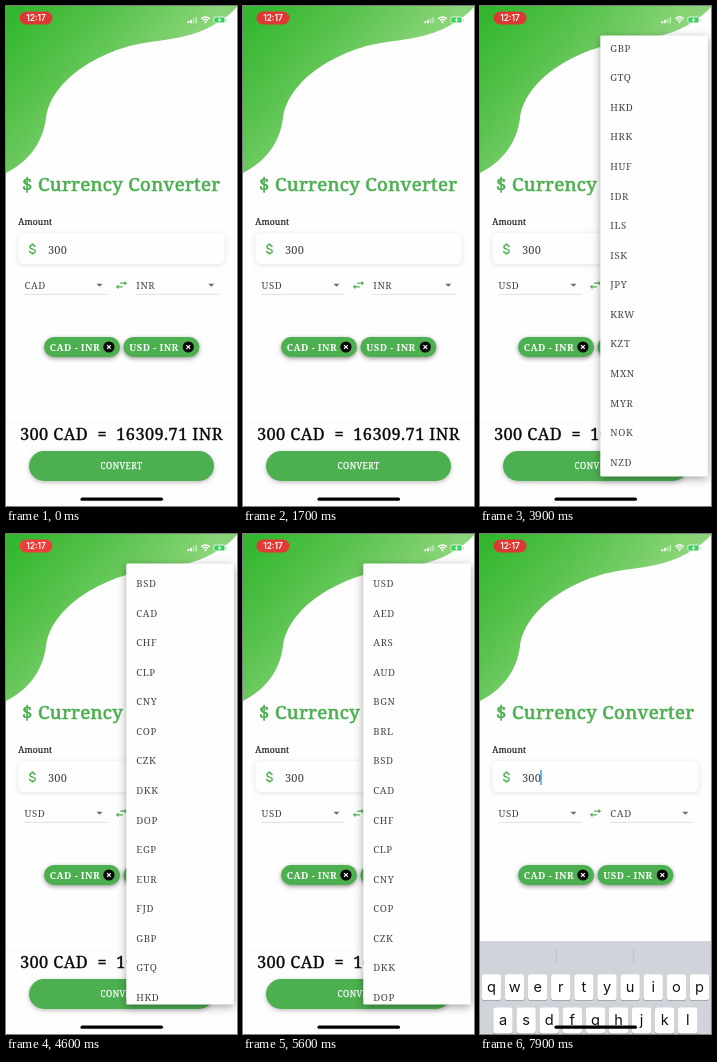
An HTML page with a canvas that plays this animation: 231x500 px, repeating every 8 s.

```html
<!DOCTYPE html>
<html lang="en">
<head>
<meta charset="utf-8">
<title>Currency Converter</title>
<style>
  html, body { margin: 0; width: 100%; height: 100%; overflow: hidden; background: #fefefe; }
  canvas { display: block; width: 231px; height: 500px; }
</style>
</head>
<body>
<canvas id="stage"></canvas>
<script>
const W = 231, H = 500, LOOP = 8000, STEP = 100;
const DP = W / 375;                 // one layout unit in pixels
const GREEN = '#4caf50';
const SERIF = '"Noto Serif", serif', SANS = 'Inter, sans-serif';

const CODES = ('USD AED ARS AUD BGN BRL BSD CAD CHF CLP CNY COP CZK DKK DOP EGP EUR FJD GBP GTQ HKD ' +
  'HRK HUF IDR ILS ISK JPY KRW KZT MXN MYR NOK NZD PAB PEN PHP PKR PLN PYG RON RUB SAR SEK SGD ' +
  'THB TRY TWD UAH UYU ZAR INR').split(' ');
const ITEM = 48 * DP, PAD = 8 * DP;
const MENU_TOP = 48 * DP, MENU_BOTTOM = H - 48 * DP, MENU_H = MENU_BOTTOM - MENU_TOP;
const MAX_SCROLL = CODES.length * ITEM + 2 * PAD - MENU_H;

const LEFT = { x: 8.5, open: 380, close: 1620, from: 'CAD', to: 'USD' };
const RIGHT = { x: 120.3, open: 2280, close: 6320, from: 'INR', to: 'CAD' };
const MENU_W = 107.5;
const CODE_STYLE = { spacing: 0.6 };

// Each fling: start, end, scroll before, scroll after
const FLINGS = [
  [3100, 3800, MAX_SCROLL, 22 * ITEM],
  [3800, 4600, 22 * ITEM, 6 * ITEM],
  [4800, 5500, 6 * ITEM, 0]
];

const canvas = document.getElementById('stage');
const ctx = canvas.getContext('2d');
const ratio = window.devicePixelRatio || 1;
canvas.width = Math.round(W * ratio);
canvas.height = Math.round(H * ratio);

const clamp = v => Math.min(1, Math.max(0, v));
const span = (v, a, b) => clamp((v - a) / (b - a));
const mix = (a, b, k) => a + (b - a) * k;
const easeOut = k => 1 - (1 - k) ** 2;
const ease = k => k * k * (3 - 2 * k);

const swapIcon = new Path2D('M6.99 11L3 15l3.99 4v-3H14v-2H6.99v-3zM21 9l-3.99-4v3H10v2h7.01v3z');
const dropIcon = new Path2D('M7 10l5 5 5-5z');
const boltIcon = new Path2D('M1 -3.4L-2 .5H-.2L-1 3.4L2 -.6H.2z');
const blob = new Path2D('M0 0H231V1C224 9 212 17 200 23C180 33 150 34 128 39C100 45 46 70 40 112C37 137 22 156 0 167z');

function box(x, y, w, h, r, fill, shadow) {
  ctx.save();
  if (shadow) {
    ctx.shadowColor = `rgba(0,0,0,${shadow.a})`;
    ctx.shadowBlur = shadow.blur * ratio;
    ctx.shadowOffsetY = shadow.y * ratio;
  }
  ctx.fillStyle = fill;
  ctx.beginPath();
  ctx.roundRect(x, y, w, h, r);
  ctx.fill();
  ctx.restore();
}

function text(str, x, y, size, color, { weight = 400, family = SERIF, align = 'left', thick = 0, spacing = 0 } = {}) {
  ctx.font = `${weight} ${size}px ${family}`;
  ctx.letterSpacing = `${spacing}px`;
  ctx.textAlign = align;
  ctx.fillStyle = color;
  ctx.fillText(str, x, y);
  if (thick) {
    ctx.strokeStyle = color;
    ctx.lineWidth = thick;
    ctx.lineJoin = 'round';
    ctx.strokeText(str, x, y);
  }
}

function line(x1, y1, x2, y2, color, width) {
  ctx.strokeStyle = color;
  ctx.lineWidth = width;
  ctx.beginPath();
  ctx.moveTo(x1, y1);
  ctx.lineTo(x2, y2);
  ctx.stroke();
}

function icon(path, cx, cy, color) {
  ctx.save();
  ctx.translate(cx, cy);
  ctx.scale(DP, DP);
  ctx.translate(-12, -12);
  ctx.fillStyle = color;
  ctx.fill(path);
  ctx.restore();
}

function header() {
  const g = ctx.createLinearGradient(5, 15, 115, 115);
  g.addColorStop(0, '#34b730');
  g.addColorStop(0.45, '#57c24c');
  g.addColorStop(1, '#89d478');
  ctx.fillStyle = g;
  ctx.fill(blob);
}

function statusBar(t) {
  const glow = ((1 + Math.cos((t - 3000) / 2000 * 2 * Math.PI)) / 2) ** 2;
  box(13.5, 5.5, 33, 13, 6.5, `rgb(${mix(222, 255, glow)},${mix(56, 70, glow)},${mix(52, 66, glow)})`);
  text('12:17', 30, 15, 8.3, '#fff', { weight: 600, family: SANS, align: 'center' });

  for (let i = 0; i < 4; i++) {
    const h = 2.2 + i * 1.3;
    box(181.5 + i * 2.6, 17.2 - h, 1.8, h, 0.5, i < 2 ? '#fff' : 'rgba(255,255,255,.45)');
  }

  ctx.strokeStyle = '#fff';
  ctx.lineWidth = 1.3;
  for (const r of [3.6, 6]) {
    ctx.beginPath();
    ctx.arc(199.5, 17, r, -Math.PI * 0.75, -Math.PI * 0.25);
    ctx.stroke();
  }
  ctx.fillStyle = '#fff';
  ctx.beginPath();
  ctx.moveTo(199.5, 17.4);
  ctx.arc(199.5, 17.2, 2.1, -Math.PI * 0.75, -Math.PI * 0.25);
  ctx.fill();

  box(207.5, 10.5, 12, 7, 2, 'rgba(255,255,255,.75)');
  box(208.4, 11.4, 10.2, 5.2, 1.2, '#35cf5b');
  box(220, 12.8, 0.9, 2.4, 0.4, '#b9dcb9');
  ctx.save();
  ctx.translate(213.5, 14);
  ctx.fillStyle = '#fff';
  ctx.fill(boltIcon);
  ctx.restore();
}

function dollar(cx, cy) {
  ctx.save();
  ctx.translate(cx, cy);
  ctx.strokeStyle = GREEN;
  ctx.lineWidth = 1.4;
  ctx.stroke(new Path2D('M2.6 -1.9C2.4 -5 -2.6 -4.8 -2.6 -2C-2.6 1 2.8 -.6 2.8 2.2C2.8 4.8 -2.7 4.9 -2.9 1.7'));
  line(0, -5.6, 0, -4, GREEN, 1.8);
  line(0, 4, 0, 5.6, GREEN, 1.8);
  ctx.restore();
}

function amountField(focused) {
  text('Amount', 12.2, 218.8, 8.6, '#1c1c1c', { thick: 0.2, spacing: 0.15 });
  box(12.5, 227, 206, 31, 5, '#fefefe', { a: 0.11, blur: 5, y: 1 });
  dollar(26.5, 243);
  text('300', 42, 247.5, 11, '#3c3c3c', { spacing: 0.2 });
  if (focused) box(60.3, 236, 1.3, 15, 0.5, '#2485e8');
}

function picker(x, value) {
  text(value, x, 283.2, 9.6, '#444', CODE_STYLE);
  icon(dropIcon, x + 75, 279, '#6b6b6b');
  line(x - 0.3, 288.4, x + 82.7, 288.4, '#d4d4d4', 0.7);
}

function chip(x, label) {
  box(x, 331, 76, 20, 10, GREEN, { a: 0.4, blur: 4, y: 1.5 });
  text(label, x + 5.8, 344.8, 9.5, '#fff', { weight: 700, spacing: 0.4 });
  const cx = x + 64.9, cy = 341, d = 1.9;
  box(cx - 5.6, cy - 5.6, 11.2, 11.2, 5.6, '#060606');
  line(cx - d, cy - d, cx + d, cy + d, '#fff', 1.2);
  line(cx + d, cy - d, cx - d, cy + d, '#fff', 1.2);
}

function bottomBar() {
  const g = ctx.createLinearGradient(0, 413, 0, 417);
  g.addColorStop(0, 'rgba(0,0,0,0)');
  g.addColorStop(1, 'rgba(0,0,0,.015)');
  ctx.fillStyle = g;
  ctx.fillRect(0, 413, W, 4);
  box(0, 417, W, 83, 0, '#fefefe');
  text('300 CAD\u00a0 =\u00a0 16309.71 INR', 115.4, 434.2, 16.4, '#080808', { align: 'center', thick: 0.35, spacing: 0.4 });
  box(23, 445, 185, 30, 15, GREEN, { a: 0.26, blur: 4, y: 1.5 });
  text('CONVERT', 115.5, 463.2, 8.4, '#fff', { align: 'center', thick: 0.25, spacing: 0.45 });
}

function scrollAt(t) {
  let pos = MAX_SCROLL;
  for (const [a, b, from, to] of FLINGS) {
    if (t >= a) pos = mix(from, to, easeOut(span(t, a, b)));
  }
  return pos;
}

// The panel fades in, grows out of the chosen row, then the rows appear in turn.
function menu(m, t, scroll) {
  if (t < m.open || t >= m.close + 75) return;
  const p = span(t, m.open, m.open + 300);
  const fade = span(p, 0, 0.25) * (1 - span(t, m.close, m.close + 75));
  if (!fade) return;

  const chosen = CODES.indexOf(m.from);
  const rowTop = MENU_TOP + PAD + chosen * ITEM - scroll;
  const grow = ease(span(p, 0.25, 0.5));
  const top = mix(Math.max(MENU_TOP, rowTop), MENU_TOP, grow);
  const bottom = mix(Math.min(MENU_BOTTOM, rowTop + ITEM), MENU_BOTTOM, grow);
  const start = p < 0.5 ? top : MENU_TOP;
  const end = p < 0.5 ? bottom : MENU_BOTTOM;

  ctx.save();
  ctx.globalAlpha = fade;
  box(m.x, start, MENU_W, end - start, 1.3, '#fefefe', { a: 0.36, blur: 8, y: 2.2 });
  ctx.beginPath();
  ctx.rect(m.x, start, MENU_W, end - start);
  ctx.clip();
  const unit = 0.5 / (CODES.length + 1.5);
  CODES.forEach((code, i) => {
    const y = MENU_TOP + PAD + (i + 0.5) * ITEM - scroll;
    if (y < MENU_TOP - ITEM || y > MENU_BOTTOM + ITEM) return;
    const from = 0.5 + (i + 1) * unit;
    ctx.globalAlpha = fade * (i === chosen ? 1 : span(p, from, from + 1.5 * unit));
    text(code, m.x + 10, y + 3.8, 9.6, '#444', CODE_STYLE);
  });
  ctx.restore();
}

function keyRow(letters, x, y) {
  [...letters].forEach((c, i) => {
    const cx = x + i * 23.1;
    box(cx - 9.7, y + 0.8, 19.4, 26, 3, '#8b8e94');
    box(cx - 9.7, y, 19.4, 26, 3, '#fff');
    text(c, cx, y + 17.3, 14.6, '#111', { family: SANS, align: 'center' });
  });
}

function keyboard(t) {
  const rise = easeOut(span(t, 7797, 8197));
  if (!rise) return;
  const top = H - 207 * rise;
  box(0, top, W, 207, 0, '#d0d3d9');
  line(76.5, top + 7, 76.5, top + 23, '#b9bcc2', 0.7);
  line(153.5, top + 7, 153.5, top + 23, '#b9bcc2', 0.7);
  keyRow('qwertyuiop', 11.5, top + 33.2);
  keyRow('asdfghjkl', 23, top + 66.5);
}

function draw(t) {
  ctx.setTransform(ratio, 0, 0, ratio, 0, 0);
  ctx.fillStyle = '#fefefe';
  ctx.fillRect(0, 0, W, H);
  header();
  text('$ Currency Converter', 115.2, 185.3, 18.7, GREEN, { align: 'center', thick: 0.65, spacing: 0.3 });
  amountField(t >= 7700);
  picker(18.5, t < LEFT.close ? LEFT.from : LEFT.to);
  picker(130.3, t < RIGHT.close ? RIGHT.from : RIGHT.to);
  icon(swapIcon, 115.5, 279, GREEN);
  chip(38, 'CAD - INR');
  chip(117.4, 'USD - INR');
  bottomBar();
  menu(LEFT, t, 0);
  menu(RIGHT, t, scrollAt(t));
  keyboard(t);
  statusBar(t);
  box(74.5, 491.6, 82.5, 3.2, 1.6, '#000');
}

let began;
function tick(now) {
  if (began === undefined) began = now;
  const t = (now - began) % LOOP;
  draw(Math.floor(t / STEP) * STEP);
  requestAnimationFrame(tick);
}
draw(0);
requestAnimationFrame(tick);
</script>
</body>
</html>
```
